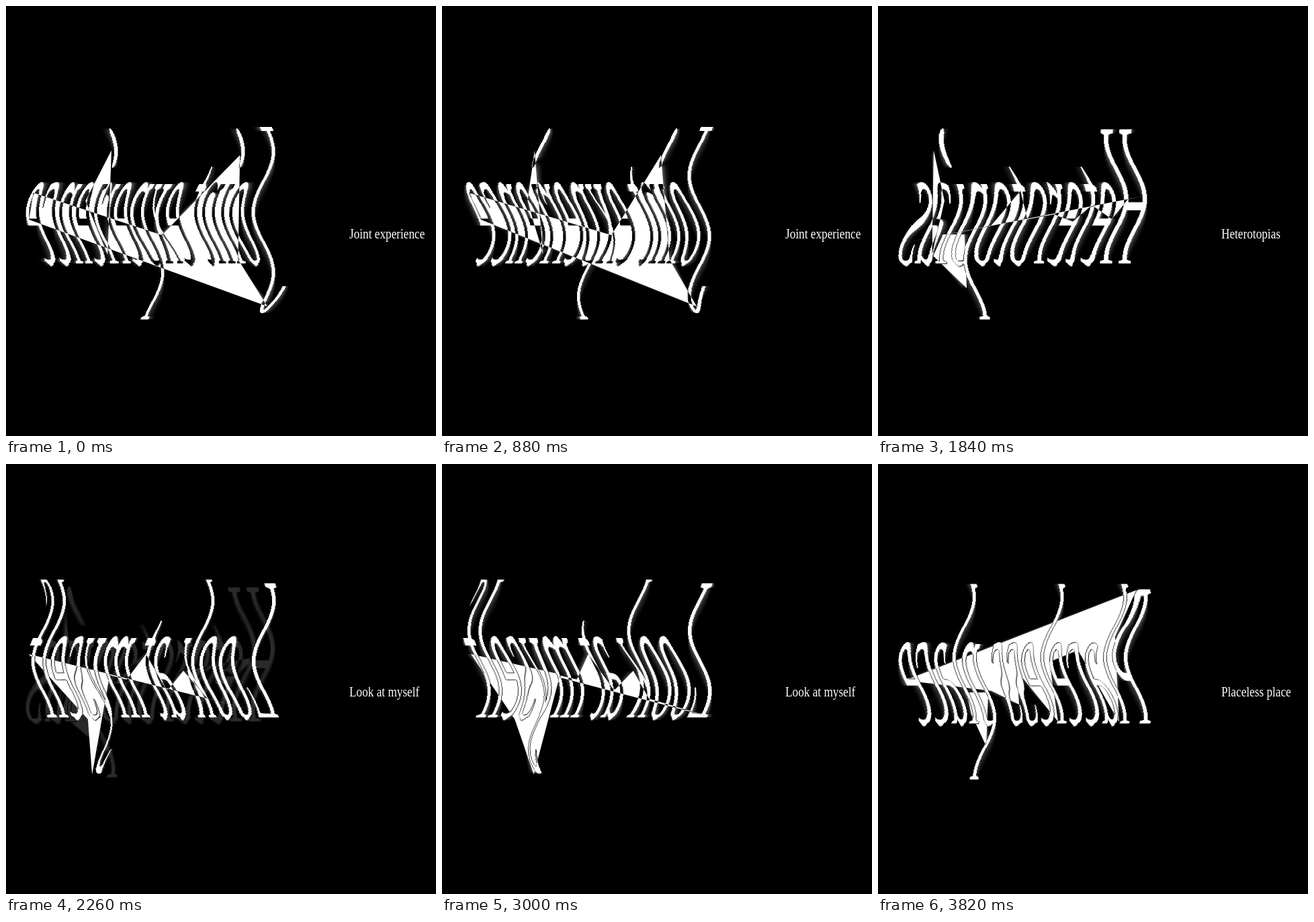
These frames come from a looping animation (640 by 640 pixels, 3.84 s). An HTML page with a canvas:

```html
<!DOCTYPE html>
<html>
<head>
<meta charset="utf-8">
<style>
html, body { margin: 0; height: 100%; overflow: hidden; background: #000; }
canvas { display: block; }
</style>
</head>
<body>
<canvas id="stage" width="640" height="640"></canvas>
<script>
const SIZE = 640, LOOP = 3840, LEFT = 44, RIGHT = 392, TOP = 172, BOTTOM = 474;
const SERIF = '"Liberation Serif", "Times New Roman", serif';

// A chord from a to b whose way back rises into teeth, each [part of the chord, rise]
function ridge([ax, ay], [bx, by], teeth, floor = 0, fore = 0.05, back = 0.1) {
  const at = (part, rise) => [ax + (bx - ax) * part, ay + (by - ay) * part + rise];
  const edge = teeth.flatMap(([part, rise]) =>
    [at(part + fore, floor), at(part, rise), at(part - back, floor)]);
  return [[ax, ay], [bx, by], ...edge];
}
const spike = x => [[x, 215], [x, 370], [x - 11, 290]];
const tail = x => [[x - 36, 372], [x - 32, 340], [x, 340], [x, 420]];

// base: baseline; crest: wave offset; cut inverts the letters, cover hides them
const scenes = [
  { text: 'Joint experience', start: 0, base: 383, crest: 216,
    cut: [
      [...ridge([48, 318], [392, 447], [[0.83, -203]], -48, 0, 0.28), [49, 278]],
      spike(142)
    ], cover: [] },
  { text: 'Heterotopias', start: 1080, base: 383, crest: 220,
    cut: [ridge([50, 352], [380, 283], [[0.88, 26], [0.71, 18], [0.45, -46]]), spike(95)],
    cover: [tail(133)] },
  { text: 'Look at myself', start: 2180, base: 377, crest: 162,
    cut: [ridge([48, 283], [390, 375], [[0.67, -37], [0.51, -47]])],
    cover: [[[48, 283], [166, 313], [142, 462], [107, 380]]] },
  { text: 'Placeless place', start: 3240, base: 386, crest: 252,
    cut: [],
    cover: [ridge([46, 322], [370, 188], [[0.92, 185], [0.64, 147], [0.47, 99]], 65), tail(160)] }
];

function layer() {
  const canvas = document.createElement('canvas');
  canvas.width = canvas.height = SIZE;
  return canvas.getContext('2d');
}

// Heights above the baseline: in the tall type, in the plain font
const heights = [[-84, -66], [-78, -54], [0, 0], [6, 14], [118, 140], [148, 177], [190, 186], [205, 208]];

function fontHeight(h) {
  let i = 1;
  while (i < heights.length - 1 && h > heights[i][0]) i++;
  const [h0, f0] = heights[i - 1], [h1, f1] = heights[i];
  return f0 + (f1 - f0) * (h - h0) / (h1 - h0);
}

function drawHook(g) {
  g.strokeStyle = g.fillStyle = '#fff';
  g.fillRect(373, 180, 18, 6);
  g.lineWidth = 5;
  g.beginPath();
  g.moveTo(383, 182);
  g.lineTo(383, 425);
  g.bezierCurveTo(383, 475, 398, 455, 403, 417);
  g.stroke();
}

// Mirrored type, fitted to the column and stretched upwards
function buildLetters({ text, base }) {
  const hooked = text[0] === 'J';
  const word = hooked ? text.slice(1) : text;
  const right = hooked ? 370 : RIGHT;
  const plain = layer();
  plain.font = '305px ' + SERIF;
  plain.fillStyle = '#fff';
  const box = plain.measureText(word);
  const ink = box.actualBoundingBoxLeft + box.actualBoundingBoxRight;
  plain.translate(right, base);
  plain.scale((LEFT - right) / ink, 1);
  plain.fillText(word, box.actualBoundingBoxLeft, 0);

  const tall = layer();
  for (let y = TOP; y < BOTTOM; y++) {
    const from = base - fontHeight(base - y);
    const to = base - fontHeight(base - y - 1);
    tall.drawImage(plain.canvas, 0, from, SIZE, to - from, 0, y, SIZE, 1);
  }
  if (hooked) drawHook(tall);
  return tall.canvas;
}

function buildEdges(letters) {
  const g = layer();
  g.drawImage(letters, 0, 0);
  g.globalCompositeOperation = 'xor';
  g.drawImage(letters, 1, 1);
  return g.canvas;
}

for (const s of scenes) {
  s.letters = buildLetters(s);
  s.edges = buildEdges(s.letters);
}

const sceneAt = t => scenes.findLast(s => t >= s.start) || scenes[0];
const work = layer();
const ctx = document.getElementById('stage').getContext('2d');

function drawPose(t) {
  const s = sceneAt(t);
  const crest = s.crest - 0.0615 * t;
  const sway = y => 15 * Math.cos((y - crest) * Math.PI / 90);

  const wave = image => {
    for (let y = TOP; y < BOTTOM; y++) {
      work.drawImage(image, 0, y, SIZE, 1, Math.round(sway(y)), y, SIZE, 1);
    }
  };
  const shape = points => {
    const path = new Path2D();
    for (const [x, y] of points) path.lineTo(x + sway(y), y);
    path.closePath();
    return path;
  };

  work.clearRect(0, 0, SIZE, SIZE);
  work.fillStyle = '#fff';
  wave(s.letters);

  work.save();
  work.globalCompositeOperation = 'xor';
  for (const points of s.cut) work.fill(shape(points), 'evenodd');
  work.restore();

  if (s.cover.length) {
    const area = new Path2D();
    for (const points of s.cover) area.addPath(shape(points));
    work.save();
    work.fill(area);
    work.clip(area);
    work.globalCompositeOperation = 'destination-out';
    wave(s.edges);
    work.restore();
  }
  ctx.drawImage(work.canvas, 0, 0);
}

function render(t) {
  ctx.fillStyle = '#000';
  ctx.fillRect(0, 0, SIZE, SIZE);
  // older poses linger faintly behind the current one
  for (let lag = 320; lag > 0; lag -= 80) {
    ctx.globalAlpha = 0.25 * Math.exp(-lag / 150);
    drawPose(t - lag);
  }
  ctx.globalAlpha = 1;
  drawPose(t);

  ctx.save();
  ctx.fillStyle = '#fff';
  ctx.font = '20.5px ' + SERIF;
  ctx.translate(511, 346);
  ctx.scale(0.84, 1);
  ctx.fillText(sceneAt(t).text, 0, 0);
  ctx.restore();
}

const begin = performance.now();
function tick() {
  render((performance.now() - begin) % LOOP);
  requestAnimationFrame(tick);
}
tick();
</script>
</body>
</html>
```
